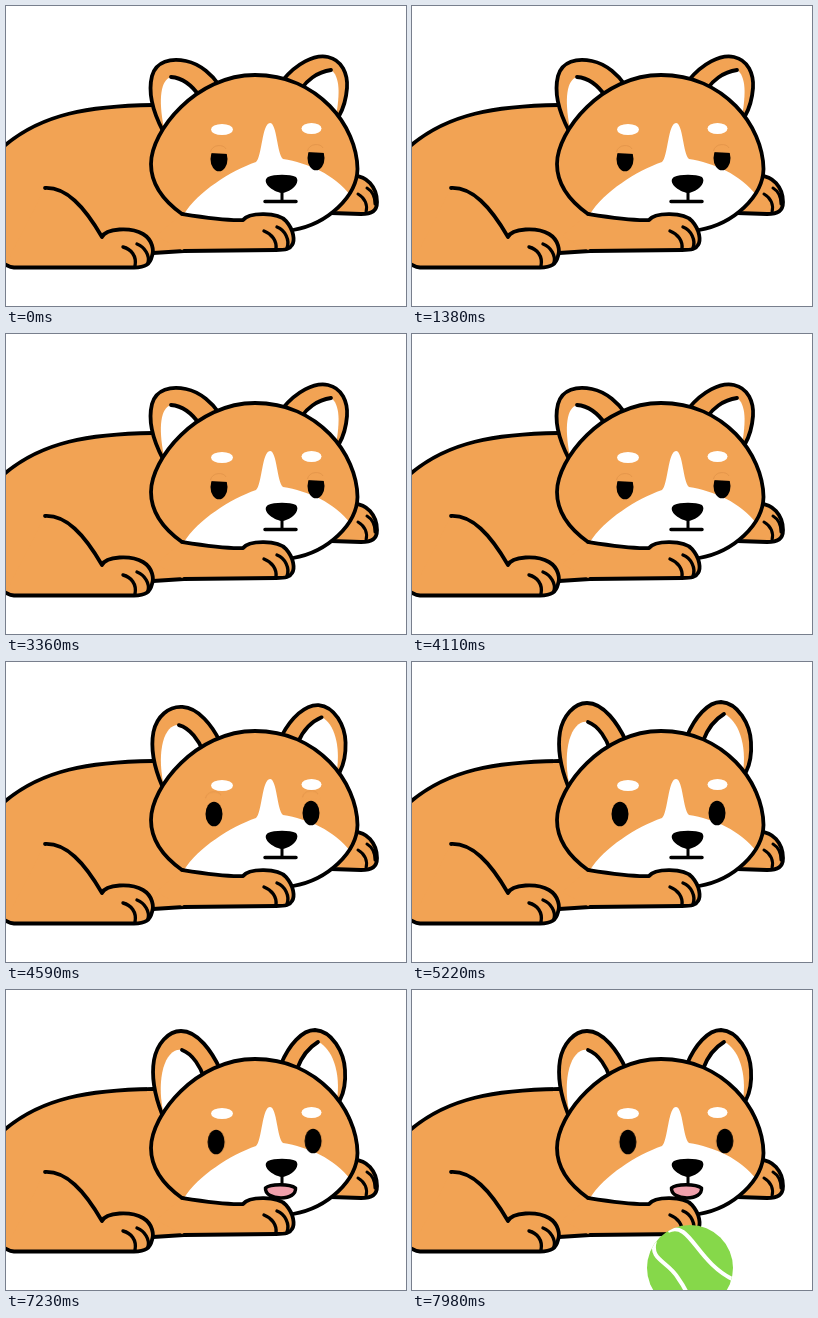
These frames come from a looping animation (400x300 px, 8 s). An HTML page:

```html
<!DOCTYPE html>
<html lang="en">
<head>
<meta charset="utf-8">
<title>Resting dog</title>
<style>
  html, body { margin: 0; width: 100%; height: 100%; overflow: hidden; background: #fff; }
  svg { display: block; width: 100vw; height: 100vh; }
  .fur { fill: #f2a354; }
  .line { stroke: #000; stroke-width: 3.8; stroke-linecap: round; stroke-linejoin: round; }
  .open { fill: none; }
  .white { fill: #fff; }
  .crease { fill: none; stroke: #df9148; stroke-width: .7; }

  .ear-l, .inner-l, .fold-l, .ear-r, .inner-r, .fold-r, .gaze, .lid, .mouth, .ball {
    animation: 8s linear infinite both;
  }

  /* Ears perk up */
  .ear-l { animation-name: ear-l; }
  .inner-l { animation-name: inner-l; }
  .fold-l { animation-name: fold-l; }
  .ear-r { animation-name: ear-r; }
  .inner-r { animation-name: inner-r; }
  .fold-r { animation-name: fold-r; }
  @keyframes ear-l {
    0%, 55.25% { d: path("M157 125C147 106 142 86 146 70C150 55 165 52 180 55C195 58 207 70 213 79L200 115Z"); animation-timing-function: ease-out; }
    59.25%, 100% { d: path("M156 124C149 106 145 88 148 70C151 54 162 41 175 41C192 41 206 62 214 79L200 115Z"); }
  }
  @keyframes inner-l {
    0%, 55.25% { d: path("M165 71C155 74 152 92 158 122L200 98L195 92C188 82 178 72 165 71Z"); animation-timing-function: ease-out; }
    59.25%, 100% { d: path("M176 60C160 57 150 86 157 121L200 98L198 89C195 78 187 64 176 60Z"); }
  }
  @keyframes fold-l {
    0%, 55.25% { d: path("M165 71C178 72 188 82 194 91"); animation-timing-function: ease-out; }
    59.25%, 100% { d: path("M176 60C187 64 195 78 198 88"); }
  }
  @keyframes ear-r {
    0%, 55.25% { d: path("M277 74C290 58 308 48 322 51C336 54 342 68 341 82C340 95 337 103 333 110L300 110Z"); animation-timing-function: ease-out; }
    59.25%, 100% { d: path("M275 74C283 55 296 40 309 40C326 41 338 62 339 80C340 95 337 104 334 110L300 110Z"); }
  }
  @keyframes inner-r {
    0%, 55.25% { d: path("M325 64C334 70 334 88 330 110L295 90L296 82C300 76 310 66 325 64Z"); animation-timing-function: ease-out; }
    59.25%, 100% { d: path("M312 52C326 58 335 82 331 110L295 90L291 80C295 68 302 58 312 52Z"); }
  }
  @keyframes fold-r {
    0%, 55.25% { d: path("M325 64C310 66 300 76 296 82"); animation-timing-function: ease-out; }
    59.25%, 100% { d: path("M312 52C302 58 295 68 291 79"); }
  }

  .gaze { animation-name: gaze; }
  @keyframes gaze {
    0%, 55.1% { transform: translate(5px, 1px); animation-timing-function: ease-in-out; }
    57%, 87% { transform: none; }
    100% { transform: translateX(8px); }
  }

  .lid { animation-name: lid; }
  @keyframes lid {
    0%, 20.6% { transform: none; animation-timing-function: ease-in-out; }
    29.25%, 34.8% { transform: translateY(2px); animation-timing-function: ease-in-out; }
    42%, 55.1% { transform: none; animation-timing-function: ease-out; }
    57.75% { transform: translateY(-9px); opacity: 1; }
    58%, 100% { transform: translateY(-9px); opacity: 0; }
  }

  .mouth { animation-name: mouth; }
  @keyframes mouth {
    0%, 65.6% { d: path("M259 195.5C264 195.5 284 195.5 290 195.5C290 195.5 284 195.5 275 195.5C266 195.5 259 195.5 259 195.5Z"); animation-timing-function: ease-out; }
    68.75%, 100% { d: path("M259.5 198C264 193.5 284 193.5 289.5 198C290 204 284 208 275 208C266 208 259 204 259.5 198Z"); }
  }

  .ball { animation-name: ball; transform-origin: 278px 278px; }
  @keyframes ball {
    0%, 93.1% { transform: translateY(68px) rotate(-40deg); animation-timing-function: ease-out; }
    99.75%, 100% { transform: none; }
  }
</style>
</head>
<body>
<svg viewBox="0 0 400 300" preserveAspectRatio="none">
  <defs>
    <path id="head" d="M176 208C155 193 145 176 145 158C145 125 190 69 249 69C312 69 351 120 351.5 163C351 190 322 218 287 224Q230 232 176 208Z"/>
    <clipPath id="in-head"><use href="#head"/></clipPath>
    <clipPath id="in-ball"><circle cx="278" cy="278" r="43"/></clipPath>
  </defs>

  <!-- Far paw -->
  <g class="line">
    <path class="fur" d="M345 170C361 168 371 182 371 196C371 205 366 208 355 208L325 207Z"/>
    <path class="open" stroke-width="3" d="M352 188C359 192 362 199 360 206M361 182C366 185 369 191 369 198"/>
  </g>

  <!-- Body -->
  <path class="fur" d="M-4 141C35 107 85 100 150 99L270 140V243L178 245L140 247L100 261H8L-4 258Z"/>
  <path class="line open" d="M-4 142C35 107 85 100 147 99M147 247L178 245"/>

  <g class="line">
    <path class="ear-l fur"/>
    <path class="ear-r fur"/>
  </g>
  <path class="inner-l white"/>
  <path class="inner-r white"/>
  <g class="line open">
    <path class="fold-l"/>
    <path class="fold-r"/>
  </g>

  <!-- Head -->
  <use href="#head" class="fur"/>
  <path class="white" clip-path="url(#in-head)" d="M178 208C192 186 224 165 250 156C256 151 256 117 264 117C271 117 271 148 277 153C302 157 328 168 345 190L300 235H200Z"/>
  <use href="#head" class="line open"/>
  <ellipse class="white" cx="216" cy="123.5" rx="11" ry="5.5"/>
  <ellipse class="white" cx="305.5" cy="122.5" rx="10" ry="5.5"/>
  <g class="gaze">
    <ellipse cx="208" cy="152" rx="8.5" ry="12.3"/>
    <ellipse cx="305" cy="151" rx="8.5" ry="12.3"/>
    <g class="lid">
      <path class="fur" d="M198.5 146C199 136 216 136 217.5 147ZM295.5 145C296 135 313 135 314.5 146Z"/>
      <path class="crease" d="M199.5 145C201 137 213 137 215 142M296.5 144C298 136 310 136 312 141"/>
    </g>
  </g>
  <path d="M262 171C268 168 284 168 290 171C294 175 289 183 280 186Q276 188 272 186C263 183 256 175 262 171Z"/>
  <path class="line" style="stroke-width:3" d="M276 185V195"/>
  <path class="mouth line" style="stroke-width:3.5" fill="#f0a0ac"/>

  <!-- Near arm -->
  <path class="fur" d="M176 208C195 211 220 215 237 214C243 206 272 206 280 215C288 224 289 235 286 239C284 243 280 244 270 244L178 245L150 230Z"/>
  <g class="line open">
    <path d="M176 208C195 211 220 215 237 214C243 206 272 206 280 215C288 224 289 235 286 239C284 243 280 244 270 244L178 245"/>
    <path style="stroke-width:3.4" d="M258 225C266 228 271 235 270 243M271 221C279 224 284 234 281 242"/>
  </g>

  <!-- Hind leg -->
  <path class="fur" d="M39 182C60 181 78 200 96 231C100 222 125 221 137 228C147 234 148 245 146 250C144 258 140 261.5 128 261.5H8L0 258Z"/>
  <g class="line open">
    <path d="M39 182C60 181 78 200 96 231C100 222 125 221 137 228C147 234 148 245 146 250C144 258 140 261.5 128 261.5H8Q3 261 -3 257"/>
    <path style="stroke-width:3.4" d="M117 241C125 243 131 250 129 260M131 238C139 241 144 250 142 257"/>
  </g>

  <g class="ball">
    <circle cx="278" cy="278" r="43" fill="#86d84a"/>
    <path clip-path="url(#in-ball)" fill="none" stroke="#fff" stroke-width="4" d="M256 241C278 230 284 272 322 290M243 251C237 270 256 271 266 288Q277 303 283 324"/>
  </g>
</svg>
</body>
</html>
```
